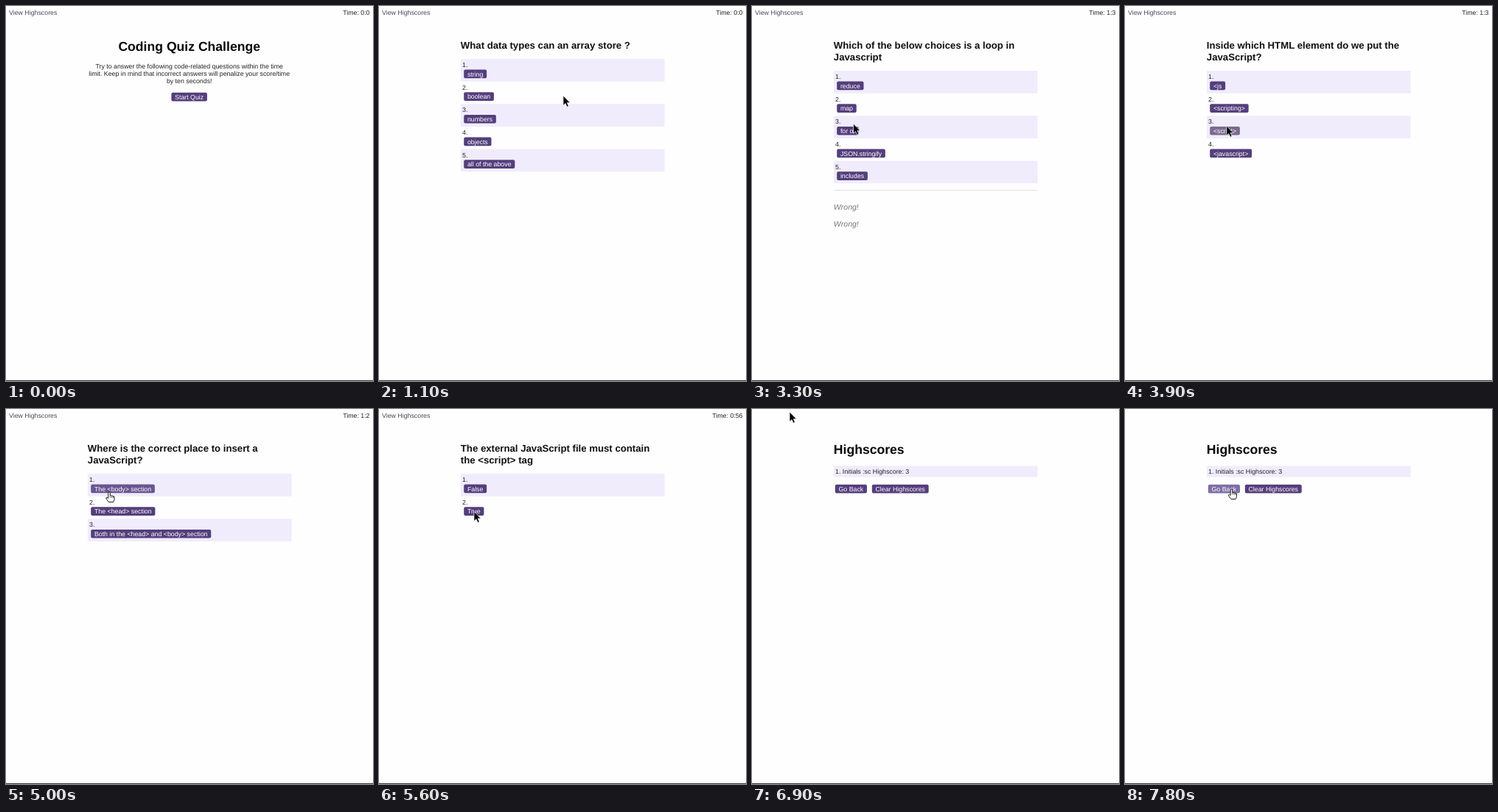
Write an HTML page that moves like this. It is 498 by 510 pixels and loops after 8000 ms.

```html
<!DOCTYPE html>
<html lang="en">
<head>
<meta charset="utf-8">
<title>Coding quiz</title>
<style>
html, body { margin: 0; width: 100%; height: 100%; overflow: hidden; background: #fefefe; }
svg { display: block; width: 498px; height: 510px; }
text { font: 8.8px "Liberation Sans", Arial, sans-serif; fill: #222; text-rendering: geometricPrecision; }
.h1 { font-size: 17.6px; font-weight: bold; fill: #080808; }
.h2 { font-size: 13.2px; font-weight: bold; fill: #111; }
.wrong { font-size: 10.56px; font-style: italic; fill: #777; }
.label { fill: #fff; }
</style>
</head>
<body>
<svg viewBox="0 0 498 510">
  <rect width="498" height="510" fill="#fefefe"/>
  <g id="screen"></g>
  <rect y="509" width="498" height="1" fill="#333"/>
  <g id="arrow"><path d="M0 0V13.2L3 10.5L5.1 15.2L7.3 14.2L5.3 9.6H9.3Z" fill="#000" stroke="#fff" stroke-width=".7"/></g>
  <g id="hand"><path d="M-1.3 8.4V1.2Q-1.3 0 0 0T1.3 1.2V4.8Q2.8 4 3.5 5.2Q5 4.6 5.5 5.8Q7 5.4 7 7V10.2L5.6 13.6H-.6L-3.9 9.2Q-4.7 7.5-3.2 7.3Z" fill="#fff" stroke="#111" stroke-width=".95" stroke-linejoin="round"/><path d="M1.3 5V7.6M3.5 5.4V7.8M5.5 6V8" stroke="#111" stroke-width=".7"/></g>
</svg>
<script>
const LOOP = 8000, STEP = 100;
const $ = id => document.getElementById(id);
const esc = s => s.replace(/&/g, "&amp;").replace(/</g, "&lt;");

const quiz = [
  { title: ["What data types can an array store ?"],
    options: ["string", "boolean", "numbers", "objects", "all of the above"] },
  { title: ["Which of the below choices is a loop in", "Javascript"],
    options: ["reduce", "map", "for of", "JSON.stringify", "includes"] },
  { title: ["Inside which HTML element do we put the", "JavaScript?"],
    options: ["<js", "<scripting>", "<script>", "<javascript>"] },
  { title: ["Where is the correct place to insert a", "JavaScript?"],
    options: ["The <body> section", "The <head> section", "Both in the <head> and <body> section"] },
  { title: ["The external JavaScript file must contain", "the <script> tag"],
    options: ["False", "True"] }
];

// start time, screen, wrong answers, hovered control, hover colour
const states = [
  [0, "start"],
  [900, "start", 0, 0, "#6a5591"],
  [1100, 0],
  [2300, 0, 0, 4, "#6a5591"],
  [2400, 1],
  [2500, 1, 0, 3, "#6a5591"],
  [2600, 1, 1, 3, "#6a5591"],
  [3100, 1, 2, 3, "#6a5591"],
  [3200, 1, 2],
  [3700, 1, 2, 2, "#6a5591"],
  [3800, 2, 0, 2, "#7a6a90"],
  [4400, 3],
  [4900, 3, 0, 0, "#6a5591"],
  [5100, 3, 1, 0, "#6a5591"],
  [5200, 3, 1],
  [5400, 3, 1, 2, "#6a5591"],
  [5500, 4],
  [6000, 4, 0, "link"],
  [6900, "scores"],
  [7700, "scores", 0, 0, "#7e6ea6"]
];

const clock = [[0, 0], [2200, 74], [3200, 63], [4200, 62], [5200, 56], [6200, 55]];

// time, x, y, pointing hand
const path = [
  [600, 266, 142, 0], [900, 250, 122, 1], [1100, 250, 122, 0], [1400, 250, 122, 0],
  [2100, 118.5, 115, 0], [2300, 140, 212, 1], [2400, 140, 212, 0], [2500, 138, 200, 1],
  [3100, 138, 198, 1], [3200, 138, 180, 0], [3300, 137.5, 160, 0], [3700, 137.5, 163, 1],
  [3800, 137.5, 162, 0], [4000, 138, 164, 1], [4400, 138, 164, 0], [4600, 138, 162, 0],
  [4900, 140, 113, 1], [5100, 140, 113, 1], [5200, 140, 124, 0], [5400, 140, 165, 1],
  [5500, 138, 155, 0], [6000, 51, 4, 1], [6900, 51, 4, 0], [7700, 144.5, 109, 1], [8000, 144.5, 109, 1]
];

const meter = document.createElement("canvas").getContext("2d");
meter.font = '88px "Liberation Sans", Arial, sans-serif';
const widthOf = s => meter.measureText(s).width / 10;

const rect = (x, y, w, h, fill, r = 0) =>
  `<rect x="${x}" y="${y}" width="${w}" height="${h}" rx="${r}" fill="${fill}"/>`;
const text = (s, x, y, cls = "", anchor = "start") =>
  `<text x="${x}" y="${y}" class="${cls}" text-anchor="${anchor}">${esc(s)}</text>`;
const band = (y, h) => rect(111, y, 276.5, h, "#f0ecfc");
const button = (s, x, y, lit) =>
  rect(x, y, widthOf(s) + 9.4, 11.7, lit || "#543e7c", 2) + text(s, x + 4.7, y + 9, "label");

function header(seconds, lit) {
  const time = `Time: ${Math.floor(seconds / 60)}:${seconds % 60}`;
  return `<g style="--c:${lit ? "#81789a" : "#4b465c"}"><text x="4" y="12.2" style="fill:var(--c)">View Highscores</text></g>` +
    text(time, 493.5, 12.2, "", "end");
}

function startScreen(lit) {
  const lines = ["Try to answer the following code-related questions within the time",
    "limit. Keep in mind that incorrect answers will penalize your score/time", "by ten seconds!"];
  return text("Coding Quiz Challenge", 248.7, 61, "h1", "middle") +
    lines.map((s, i) => text(s, 248.7, 85.4 + i * 9.8, "", "middle")).join("") +
    button("Start Quiz", 224.4, 117.8, lit);
}

function question({ title, options }, wrongs, hover, colour) {
  const top = 56 + title.length * 16, rowH = 30.65;
  let out = title.map((s, i) => text(s, 110.8, 57.6 + i * 16, "h2")).join("");
  options.forEach((s, i) => {
    const y = top + i * rowH;
    if (i % 2 === 0) out += band(y, rowH);
    out += text(`${i + 1}.`, 113, y + 11) + button(s, 115.2, y + 14.6, i === hover && colour);
  });
  const end = top + options.length * rowH;
  if (wrongs) out += rect(111, end + 8.8, 276.5, 1.2, "#e4e3e8");
  for (let i = 0; i < wrongs; i++) out += text("Wrong!", 110.8, end + 35.3 + i * 23.4, "wrong");
  return out;
}

function scores(lit) {
  return text("Highscores", 110.8, 61, "h1") + band(77.5, 15) +
    text("1. Initials :sc Highscore: 3", 113, 88) +
    button("Go Back", 112.8, 102.8, lit) + button("Clear Highscores", 162.8, 102.8);
}

const latest = (list, t) => list.filter(e => e[0] <= t).pop();

function moveCursor(t) {
  const a = latest(path, t);
  for (const [id, kind] of [["arrow", 0], ["hand", 1]])
    $(id).style.display = a && a[3] === kind ? "" : "none";
  if (!a) return;
  const b = path.find(e => e[0] > t) || a;
  const k = b === a ? 0 : (t - a[0]) / (b[0] - a[0]);
  const e = k * k * (3 - 2 * k);
  const place = `translate(${a[1] + (b[1] - a[1]) * e} ${a[2] + (b[2] - a[2]) * e})`;
  $("arrow").setAttribute("transform", place);
  $("hand").setAttribute("transform", place);
}

let shown = "";
function render(t) {
  const [, name, wrongs = 0, hover, colour] = latest(states, t);
  const seconds = latest(clock, t)[1];
  const key = [name, wrongs, hover, colour, seconds].join();
  if (key !== shown) {
    shown = key;
    $("screen").innerHTML = name === "scores" ? scores(colour)
      : header(seconds, hover === "link") +
        (name === "start" ? startScreen(colour) : question(quiz[name], wrongs, hover, colour));
  }
  moveCursor(t);
}

const began = performance.now();
function tick() {
  const t = (performance.now() - began) % LOOP;
  render(Math.floor(t / STEP) * STEP);
  requestAnimationFrame(tick);
}
tick();
</script>
</body>
</html>
```
